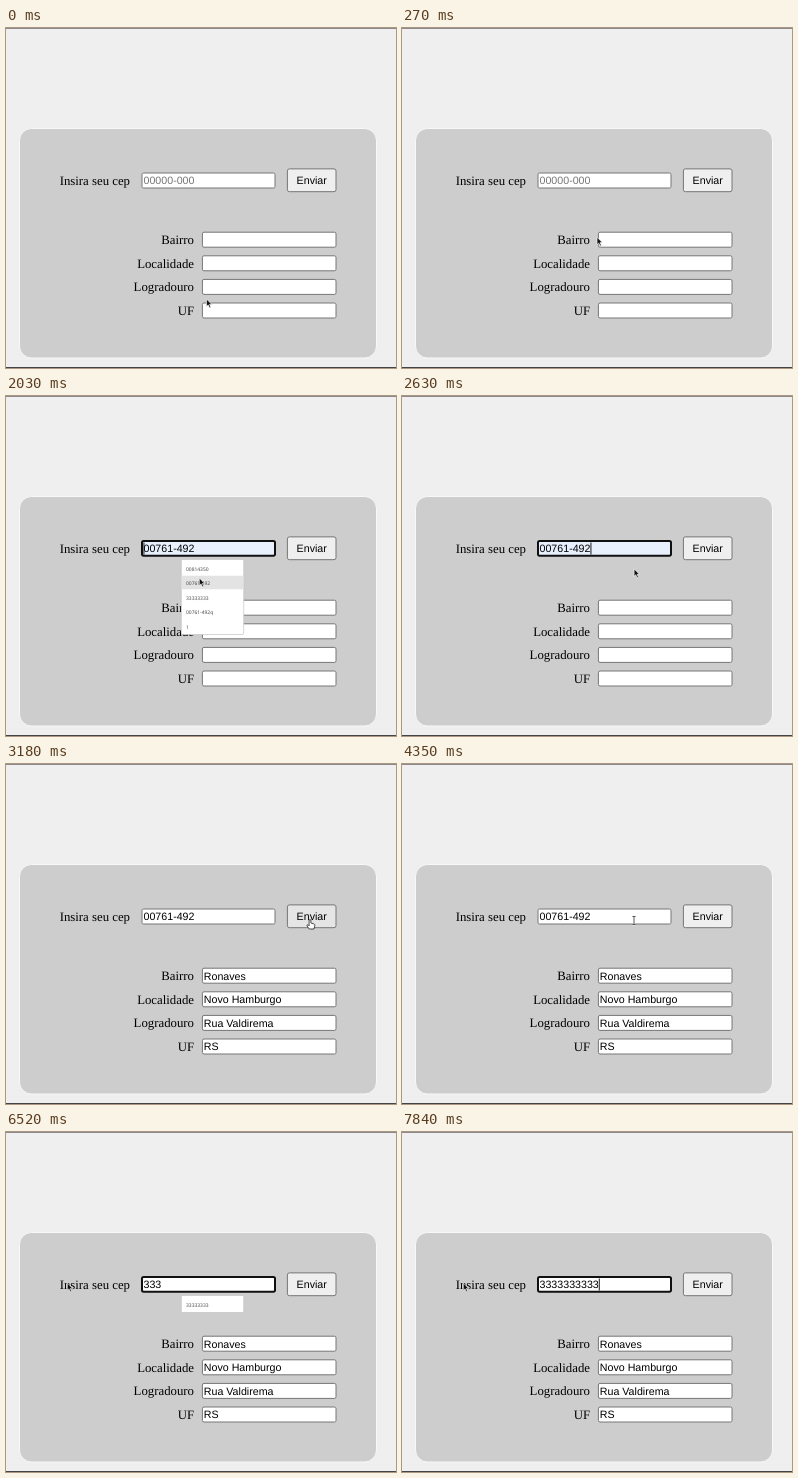
Animation of 390x340 px, one loop 8000 ms. Source, as an HTML page:

```html
<!DOCTYPE html>
<html lang="pt-BR">
<head>
<meta charset="utf-8">
<title>Busca de CEP</title>
<style>
  html, body { margin: 0; width: 100%; height: 100%; overflow: hidden; background: #efefef; }
  svg { display: block; width: 390px; height: 340px; text-rendering: geometricPrecision; }
  .label { font: 12.8px "Liberation Serif", "Times New Roman", serif; text-anchor: end; fill: #000; }
  .value { font: 10.667px "Liberation Sans", Arial, sans-serif; fill: #000; }
  .item { font: 4.95px "Open Sans", "Noto Sans", sans-serif; fill: #3c3c3c; }
  .box { fill: #fff; stroke: #767676; }
  .halo { fill: none; stroke: #fff; stroke-width: 1.8; stroke-opacity: .75; }
</style>
</head>
<body>
<svg viewBox="0 0 390 340">
  <defs>
    <clipPath id="selClip"><rect id="selArea" y="146" height="13"/></clipPath>
  </defs>
  <rect width="390" height="340" fill="#efefef"/>
  <rect width="390" height="1" fill="#8f888b"/>
  <rect y="339" width="390" height="1" fill="#444"/>
  <rect x="13.5" y="100.5" width="357" height="229.5" rx="12" fill="#cdcdcd" stroke="#f8f8f8"/>

  <text class="label" x="124" y="156.6">Insira seu cep</text>
  <rect id="field" class="box" x="136" y="145" width="133" height="15" rx="1.6"/>
  <rect id="selBack" y="146" height="13" fill="#1f5fc9"/>
  <text id="cep" class="value" x="137.5" y="155.9"></text>
  <text id="cepSel" class="value" x="137.5" y="155.9" clip-path="url(#selClip)" style="fill:#fff"></text>
  <rect id="caret" y="146.5" width=".9" height="12" fill="#000"/>

  <rect id="button" x="281.4" y="140.9" width="48.6" height="22.8" rx="2" stroke="#767676"/>
  <text class="value" x="290.6" y="155.9">Enviar</text>

  <g id="rows"></g>
  <g id="menu">
    <rect id="menuBox" x="175.3" y="163.4" width="62.4" rx="1.5" fill="#fff" stroke="#c4c4c4" stroke-width=".7"/>
    <rect id="hover" x="175.6" width="61.8" height="13.6" fill="#e3e3e3"/>
    <g id="items"></g>
  </g>

  <g id="cursor">
    <g id="arrow">
      <path d="M0 0V7.4L1.7 5.9L3 8.8L4.3 8.2L3 5.4H5.3Z" fill="#111" stroke="#fff" stroke-width=".6"/>
    </g>
    <g id="beam">
      <path class="halo" d="M-1.6-4H1.6M0-4V4M-1.6 4H1.6"/>
      <path d="M-1.6-4H1.6M0-4V4M-1.6 4H1.6" fill="none" stroke="#333" stroke-width=".8"/>
    </g>
    <g id="hand">
      <path d="M-.9 0Q0-.9.9 0V3L4.2 4Q5 4.4 4.8 5.6L4 9H-.8L-3 5.8Q-3 4.6-1.9 4.8L-.9 5.8Z" fill="#fff" stroke="#222" stroke-width=".8"/>
    </g>
  </g>
</svg>
<script>
const $ = id => document.getElementById(id);
const NS = "http://www.w3.org/2000/svg";
const LOOP = 8000, LEFT = 137.5, TOP = 163, ROW = 14.5, DIGIT = 5.93;
const CEP = "00761-492";
const HISTORY = ["00814350", CEP, "33333333", CEP + "q", "1"];
const RESULTS = [["Bairro", "Ronaves"], ["Localidade", "Novo Hamburgo"],
                 ["Logradouro", "Rua Valdirema"], ["UF", "RS"]];
const KEYS = [5560, 5760, 5990, 6920, 7080, 7240, 7400, 7560, 7700, 7840];
const FOCUS = 540, OPEN = 580, PICK = 2420, SEND = 3000, FILL = 3120, GRAB = 4630, REOPEN = 4670;

// Pointer stops: time, x, y
const PATH = [
  [0, 200.5, 271], [30, 200.5, 271], [500, 190, 152], [880, 189.5, 152.3],
  [1350, 188, 159], [1510, 188, 159], [1950, 193.3, 182], [2420, 193.5, 182],
  [2950, 304, 156], [3810, 304, 156], [4350, 232, 156.5], [4600, 191, 153],
  [4630, 190, 153], [4860, 61.3, 151], [8000, 61.3, 151]
];

function add(parent, tag, attrs, text = "") {
  const el = document.createElementNS(NS, tag);
  for (const k in attrs) el.setAttribute(k, attrs[k]);
  el.textContent = text;
  parent.append(el);
  return el;
}

const answers = RESULTS.map(([name, value], i) => {
  const y = 204.2 + i * 23.6;
  add($("rows"), "text", { class: "label", x: 188, y: y + 11.9 }, name);
  add($("rows"), "rect", { class: "box", x: 196.4, y, width: 133.6, height: 15, rx: 1.6 });
  return add($("rows"), "text", { class: "value", x: 197.8, y: y + 11.3 }, value);
});
const items = HISTORY.map((_, i) =>
  add($("items"), "text", { class: "item", x: 180, y: 174.6 + i * ROW }));

function pointer(t) {
  const i = PATH.findIndex(p => p[0] > t);
  const [t0, x0, y0] = PATH[i - 1], [t1, x1, y1] = PATH[i];
  const u = (t - t0) / (t1 - t0), e = u * u * (3 - 2 * u);
  return [x0 + (x1 - x0) * e, y0 + (y1 - y0) * e];
}

const inside = (x, y, l, t, r, b) => x >= l && x <= r && y >= t && y <= b;
const show = (el, on) => el.setAttribute("visibility", on ? "visible" : "hidden");
const set = (id, attrs) => { for (const k in attrs) $(id).setAttribute(k, attrs[k]); };

function suggestions(t, typed) {
  if (t >= OPEN && t < PICK) return HISTORY;
  if (t >= REOPEN) return HISTORY.filter(s => s.startsWith(typed ? "3".repeat(Math.min(typed, 8)) : CEP));
  return [];
}

function render(t) {
  const [x, y] = pointer(t);
  const typed = KEYS.filter(k => k <= t).length;
  const list = suggestions(t, typed);
  const focused = (t >= FOCUS && t < SEND) || t >= GRAB;

  // Suggestion menu
  const open = list.length > 0;
  const row = open && t < PICK && y > TOP + 2 ? Math.floor((y - TOP - 2) / ROW) : -1;
  const fade = Math.min(1, Math.max(0, 1 - (t - KEYS[8]) / 130));
  set("menu", { opacity: open ? fade : 0 });
  set("menuBox", { height: Math.max(0, list.length * ROW + 2.6) });
  items.forEach((el, i) => { el.textContent = list[i] || ""; });
  show($("hover"), row >= 0);
  set("hover", { y: TOP + 2.2 + Math.max(0, row) * ROW });

  // Field
  const value = typed ? "3".repeat(typed) : t >= PICK ? CEP : row >= 0 ? HISTORY[row] : "";
  const cep = $("cep");
  cep.textContent = value || "00000-000";
  cep.style.fill = value ? "#000" : "#757575";
  const tinted = row >= 0 || (t >= PICK && t < SEND);
  set("field", focused
    ? { y: 144.9, height: 14.8, "stroke-width": 2 }
    : { y: 145, height: 15, "stroke-width": 1 });
  $("field").style.stroke = focused ? "#101010" : "#767676";
  $("field").style.fill = tinted ? "#e8f0fe" : "#fff";

  // Selection grows leftwards with the drag
  const selecting = t >= GRAB && !typed;
  const end = LEFT + 8 * DIGIT + 3.55;
  const from = Math.min(end, Math.max(LEFT, x));
  const area = { x: from, width: selecting ? end - from : 0 };
  set("selBack", area);
  set("selArea", area);
  $("cepSel").textContent = selecting ? value : "";

  // Caret
  const since = typed ? KEYS[typed - 1] : t >= PICK ? PICK : FOCUS;
  const atEnd = typed || t >= PICK;
  show($("caret"), focused && !selecting && (t - since) % 1060 < 530);
  set("caret", { x: atEnd ? LEFT + (typed ? typed * DIGIT : end - LEFT) : LEFT });

  // Button and answers
  const overButton = inside(x, y, 281, 140, 331, 164);
  const pressed = t >= SEND - 60 && t < SEND + 30;
  set("button", { fill: pressed ? "#f5f5f5" : overButton ? "#e5e5e5" : "#efefef" });
  answers.forEach(el => show(el, t >= FILL));

  // Pointer
  const overField = inside(x, y, 136, 144, 269, 160.5) ||
    RESULTS.some((_, i) => inside(x, y, 196, 204 + i * 23.6, 330, 219.5 + i * 23.6));
  const beam = overField || (t >= GRAB && t < 4840);
  set("cursor", { transform: `translate(${x} ${y})` });
  show($("beam"), beam && !overButton);
  show($("hand"), overButton);
  show($("arrow"), !beam && !overButton);
}

const start = performance.now();
function tick() {
  render((performance.now() - start) % LOOP);
  requestAnimationFrame(tick);
}
tick();
</script>
</body>
</html>
```
